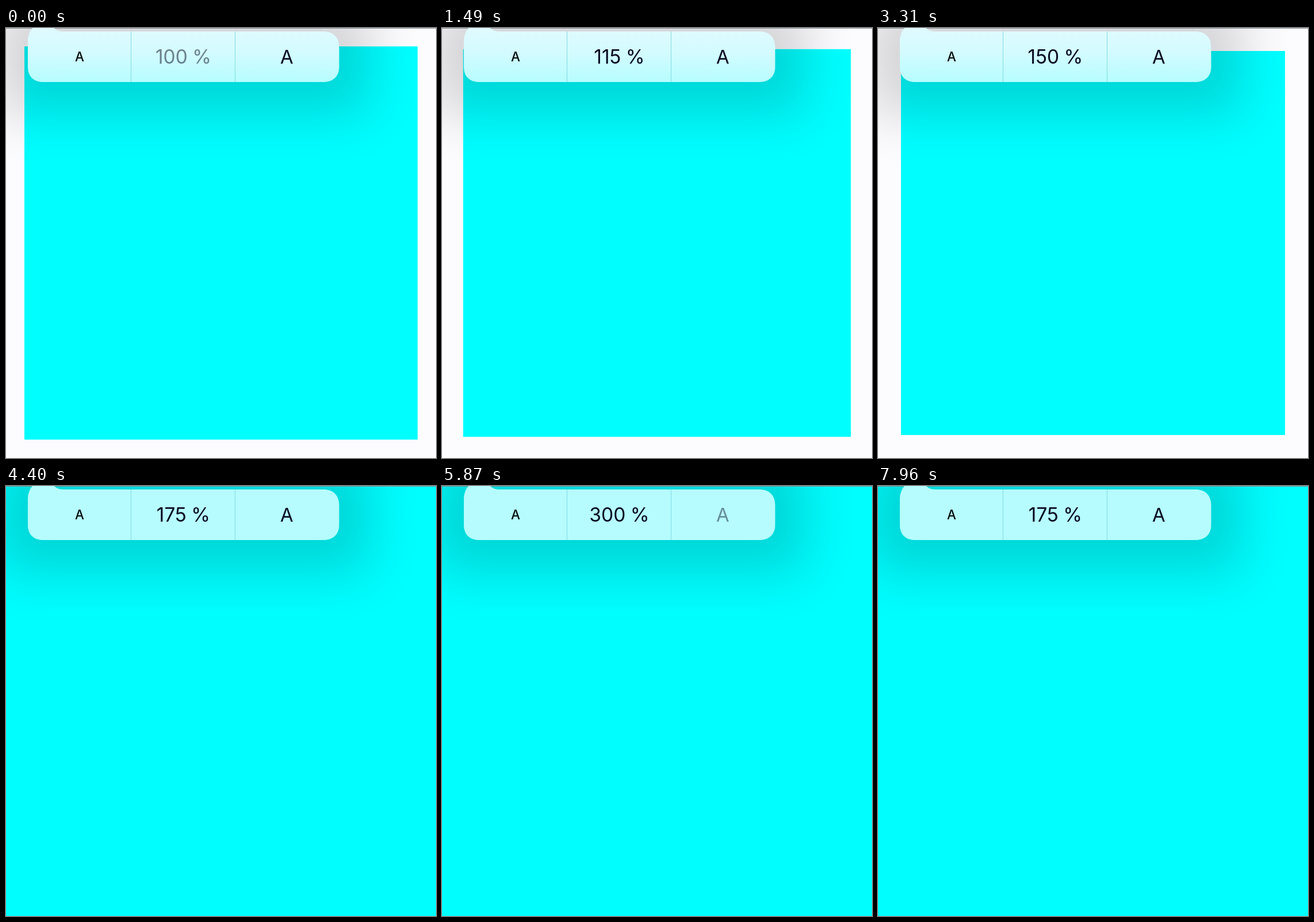
Recreate the animation shown at these times as an HTML page. Size 748 by 748 pixels, loop 8000 ms.

```html
<!DOCTYPE html>
<html lang="en">
<head>
<meta charset="utf-8">
<title>Page zoom</title>
<style>
html, body { margin: 0; width: 100%; height: 100%; overflow: hidden; background: #fcfcff; }
svg { display: block; width: 100vw; height: 100vh; }
text { font-family: Inter, Roboto, sans-serif; font-size: 33.5px; word-spacing: -1px; text-anchor: middle; fill: #070720; }
#small { font-size: 22.5px; font-weight: 500; fill: #000a0a; }
#big { font-size: 33px; }
</style>
</head>
<body>
<svg viewBox="0 0 748 748">
  <defs>
    <filter id="blur" x="-300" y="-300" width="1300" height="900" filterUnits="userSpaceOnUse"><feGaussianBlur stdDeviation="45"/></filter>
    <path id="shape" d="M38 68V24C38 13 41 5 48 -2H82C86 3 91 6 100 6H552C569 6 579.5 16 579.5 33V68C579.5 84 569 94 552 94H65C48 94 38 84 38 68Z"/>
    <clipPath id="inside"><use href="#shape"/></clipPath>
    <linearGradient id="glass" gradientUnits="userSpaceOnUse" x1="0" y1="0" x2="0" y2="94">
      <stop offset="0" stop-color="#e0faff"/>
      <stop offset=".45" stop-color="#d3fbff"/>
      <stop offset="1" stop-color="#b6fdff"/>
    </linearGradient>
  </defs>

  <rect width="748" height="748" fill="#fcfcff"/>
  <rect id="sheet" fill="#00feff"/>
  <rect x="-16" y="-50" width="649" height="200" opacity=".155" filter="url(#blur)"/>
  <rect width="748" height="1" fill="#7f8a90"/>

  <use id="panel" href="#shape"/>
  <path d="M217.5 6V94M398.5 6V94" stroke="#82dae2"/>
  <g clip-path="url(#inside)" fill="#8ef5f5">
    <rect id="less" x="38" y="-2" width="181" height="96"/>
    <rect id="more" x="398" y="-2" width="182" height="96"/>
  </g>
  <text id="small" x="128" y="58">A</text>
  <text id="label" x="308.5" y="62"></text>
  <text id="big" x="488.5" y="62">A</text>
</svg>
<script>
const LOOP = 8000, LAG = 40;
// press, release, zoom after the release
const taps = [
  [640, 830, 115], [2290, 2470, 125], [3120, 3300, 150], [4150, 4285, 175],
  [4720, 4970, 200], [5080, 5330, 250], [5570, 5830, 300],
  [6980, 7240, 250], [7300, 7530, 200], [7730, 7930, 175]
];
const $ = id => document.getElementById(id);
const set = (id, attrs) => {
  for (const name in attrs) $(id).setAttribute(name, attrs[name]);
};
const zoomAt = t => taps.reduce((z, tap) => t >= tap[1] ? tap[2] : z, 100);

function draw(t) {
  const zoom = zoomAt(t);
  // the page is laid out again shortly after the label changes
  const laid = zoomAt(t - LAG);
  const margin = laid < 175 ? 0.32 * laid : 0;
  const size = 748 - 2 * margin;
  set('sheet', { x: margin, y: margin, width: size, height: size });
  set('panel', { fill: margin ? 'url(#glass)' : '#b6fcff' });

  const tap = taps.find(p => t >= p[0] && t < p[1]);
  set('more', { opacity: tap && tap[2] > zoom ? 1 : 0 });
  set('less', { opacity: tap && tap[2] < zoom ? 1 : 0 });

  $('label').textContent = zoom + ' %';
  set('label', { opacity: zoom === 100 ? 0.5 : 1 });
  set('big', { opacity: zoom === 300 ? 0.45 : 1 });
}

const start = performance.now();
function tick() {
  draw((performance.now() - start) % LOOP);
  requestAnimationFrame(tick);
}
tick();
</script>
</body>
</html>
```
